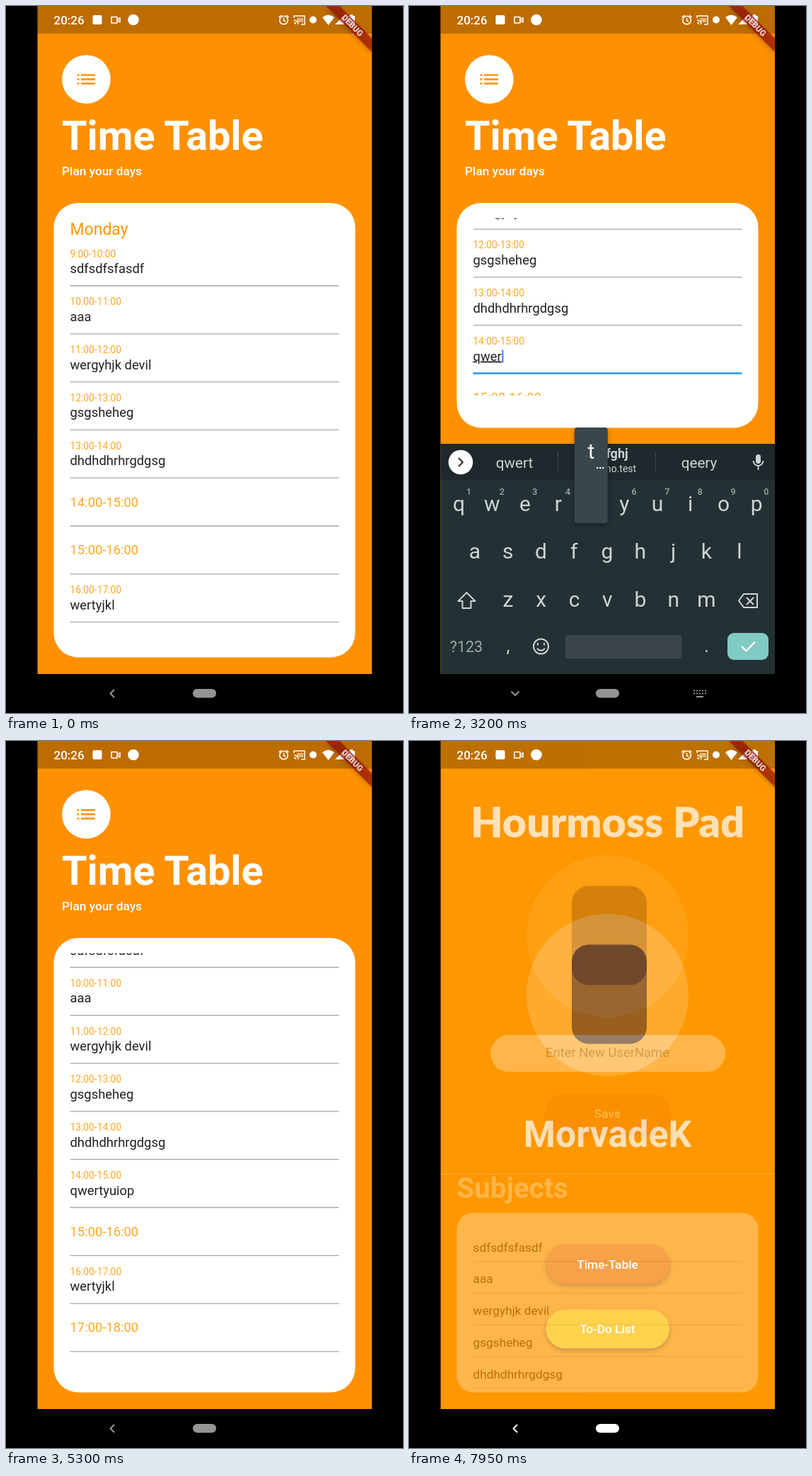
Recreate the animation shown at these times as an HTML page. Size 561x998 px, loop 8000 ms.

```html
<!DOCTYPE html>
<html lang="en">
<head>
<meta charset="utf-8">
<title>Time Table</title>
<style>
html, body { margin: 0; width: 100%; height: 100%; overflow: hidden; background: #000; }
svg { display: block; width: 100%; height: 100%; font-family: Roboto, sans-serif; fill: #fff; }
.mid { text-anchor: middle; }
.med { font-weight: 500; }
.bold { font-weight: 700; }
.title { font: 900 59px Lato, sans-serif; }
.line { fill: none; stroke-linejoin: round; }
.raised { filter: drop-shadow(0 3px 3px rgba(0, 0, 0, .3)); }
</style>
</head>
<body>
<svg id="stage" viewBox="0 0 561 998"></svg>
<script>
const text = (x, y, size, s, attrs = '') =>
  `<text x="${x}" y="${y}" font-size="${size}" ${attrs}>${s}</text>`;
const rect = (x, y, w, h, r, fill, attrs = '') =>
  `<rect x="${x}" y="${y}" width="${w}" height="${h}" rx="${r}" fill="${fill}" ${attrs}/>`;
const circle = (x, y, r, attrs = '') => `<circle cx="${x}" cy="${y}" r="${r}" ${attrs}/>`;
const line = (d, color, w = 2, attrs = '') =>
  `<path class="line" d="${d}" stroke="${color}" stroke-width="${w}" ${attrs}/>`;
const each = (list, fn) => [...list].map(fn).join('');
const MID = 'class="mid"', MID_MED = 'class="mid med"', MID_BOLD = 'class="mid bold"';

const LETTERS = 'qwertyuiop', ACTIVE = 5;
const SUBJECTS = ['sdfsdfsfasdf', 'aaa', 'wergyhjk devil', 'gsgsheheg', 'dhdhdhrhrgdgsg', '', '', 'wertyjkl', ''];
const rowY = i => 395 + 67.8 * i;
const keyX = i => 70.5 + 46.7 * i;
const screenFill = color => rect(44.5, 0, 472.5, 943, 0, color);

const avatar = y => circle(280.5, y, 114.5, 'fill-opacity=".25"') +
  rect(230, y - 71, 106, 140, 24, '#70482a');
const button = (y, color, label) => rect(193.5, y, 174.5, 55, 27.5, color, 'class="raised"') +
  text(280.5, y + 33.5, 17.25, label, MID_MED);

const home = screenFill('#ff9800') +
  text(280.5, 136, 59, 'Hourmoss Pad', 'class="mid title"') + avatar(358.5) +
  text(280.5, 573, 51.75, 'MorvadeK', MID_BOLD) +
  line('M44.5 611.5h472.5', '#ffb240', 1) +
  button(711, '#f57c00', 'Time-Table') + button(802.5, '#ffc107', 'To-Do List');

const edit = screenFill('#ff9800') + avatar(275.5) +
  rect(115, 415, 332, 52, 26, '#fff') +
  text(280.5, 446, 18.4, 'Enter New UserName', MID + ' fill="#666"') +
  button(498, '#f57c00', 'Save') +
  text(67.5, 645, 40.25, 'Subjects', 'class="bold"') +
  rect(67.5, 666, 426, 253.5, 23, '#fff') +
  each(SUBJECTS.slice(0, 5), (s, i) => text(90.5, 720.5 + 44.8 * i, 17.25, s, 'fill="#111"') +
    line(`M90.5 ${734.5 + 44.8 * i}h380`, '#bbb', 1));

const row = (subject, i) => {
  const y = rowY(i), active = i === ACTIVE, small = subject || active;
  return text(90.5, small ? y - 40.5 : y - 27.5, small ? 13.8 : 18.4, `${9 + i}:00-${10 + i}:00`,
    `fill="#ffa726" ${active ? 'id="label"' : ''}`) +
    text(90.5, y - 18, 18.4, subject, `fill="#212121" ${active ? 'id="value"' : ''}`) +
    line(`M90.5 ${y}h380`, '#a6a6a6', 1.3, active ? 'id="underline"' : '');
};

const page = screenFill('#ff9100') + circle(113.4, 103.5, 34.3) +
  line(each([97.5, 103.5, 109.5], y => `M100.5 ${y}h3M106 ${y}h20`), '#ff9100', 2.6) +
  text(79, 202.5, 57.5, 'Time Table', 'class="bold"') +
  text(79, 239, 17.25, 'Plan your days', 'class="med"') +
  rect(67.5, 278, 426, 641.5, 34.5, '#fffffd', 'id="card"') +
  `<g clip-path="url(#view)"><g id="list">${text(90.5, 323, 23, 'Monday', 'fill="#ff9800"')}
  ${each(SUBJECTS, row)}${rect(90.5, rowY(ACTIVE) - 33, 2.2, 18, 0, '#4285f4', 'id="cursor"')}</g></g>`;

const INK = '#ced4d5', DIM = '#9fa7a9';
const toolbar = line('M77 638l-6 6 6 6', '#333', 2.2) +
  line('M127 635h18v12l-6 6h-12zM139 653v-6h6M131 642h2M139 642h2M132 646q4 4 7 0', DIM) +
  text(203.5, 650, 17, 'GIF', MID_BOLD + ` fill="${DIM}"`) +
  circle(273, 644, 6, `fill="none" stroke="${DIM}" stroke-width="5"`) +
  circle(273, 644, 9, `fill="none" stroke="${DIM}" stroke-width="2.5" stroke-dasharray="4.7 4.72"`) +
  rect(332, 635, 18, 18, 2, DIM) + line('M382.5 632v25', '#3b474b', 1.2) +
  each([417, 424.5, 432], x => circle(x, 644, 2.5, `fill="${DIM}"`));

const keys = (s, x0, y) => each(s, (c, i) => text(x0 + 46.75 * i, y, 30, c, MID));
const keyboard = rect(44.5, 618, 472.5, 325, 0, '#243134') + rect(44.5, 618, 472.5, 51, 0, '#1f282c') +
  circle(73, 644, 17.3) + `<g id="toolbar">${toolbar}</g>
  <g id="hints" fill="${INK}">${line('M70 638l6 6-6 6', '#333', 2.2)}
  ${line('M210.5 630v27M348.5 630v27', '#3b474b', 1.2, 'id="dividers"')}
  ${each([149, 279.5, 410], x => text(x, 652, 20.7, '', MID))}
  <g id="contact">${text(279.5, 638, 18, 'asdfghj', MID_BOLD)}${text(279.5, 658, 14, 'a@demo.test', MID)}</g></g>` +
  rect(490, 633, 7, 13, 3.5, INK) + line('M486.5 642a7 7 0 0 0 14 0M493.5 649v6', INK, 1.8) +
  `<g fill="${INK}">${keys(LETTERS, 70.5, 712.5)}${keys('asdfghjkl', 93, 780)}${keys('zxcvbnm', 140, 847.5)}</g>
  <g fill="${DIM}">${each('1234567890', (c, i) => text(keyX(i) + 14, 690, 12.5, c, MID_MED))}
  ${text(81, 912, 21.5, '?123', MID)}</g>` +
  line('M81.5 828l-12 12h6v10h12v-10h6z', INK) +
  line('M473 830h19v19h-19l-7-9.5zM477 835l10 10M487 835l-10 10', INK) +
  text(140, 912, 25, ',', MID + ` fill="${INK}"`) + text(420.5, 912, 25, '.', MID + ` fill="${INK}"`) +
  circle(186.5, 904, 10.5, `fill="none" stroke="${INK}" stroke-width="2"`) +
  line('M182 899v3.5M191 899v3.5M181 907q5.5 6 11 0', INK) +
  rect(221, 888, 164.5, 33, 3, '#39454a') + rect(450, 885, 58, 38, 9, '#80cbc4') +
  line('M470 904l6.5 6.5 12.5-13', '#fff', 2.4) +
  `<g id="popup">${rect(-23.5, 595, 47, 135, 4, '#39464b', 'class="raised"')}
  ${text(0, 638.5, 30, '', MID)}${each([9, 13, 17], x => circle(x, 652, 1.2))}</g>`;

const status = rect(44.5, 0, 472.5, 39, 0, '#000', 'fill-opacity=".26"') +
  text(67.5, 26, 17, '20:26', 'class="med"') + rect(122.5, 13, 13, 13, 2, '#fff') +
  line('M149 15.5h8v8.5h-8zM158 19l3-2.5v6.5l-3-2.5', '#fff', 1.6) + circle(180, 19.5, 7.8) +
  circle(392.5, 20, 5.8, 'fill="none" stroke="#fff" stroke-width="1.6"') +
  line('M392.5 16.5v4l2.5 1.5M385.5 16l3.5-3M399.5 16l-3.5-3', '#fff', 1.5) +
  line('M407 17v-3h15v12h-5M407 20a6 6 0 0 1 6 6M407 23.5a2.5 2.5 0 0 1 2.5 2.5', '#fff', 1.5) +
  rect(411, 17, 9, 6, 0, '#fff', 'fill-opacity=".5"') + circle(434, 19.5, 5) +
  '<path d="M447 16q8.5-7 17 0l-8.5 11zM465 26h13v-13zM483 14h3v-2h4v2h3v13h-10z"/>' +
  `<g class="raised"><path d="M452 0h19.5l45.5 45.5v19.5z" fill="#960a0a" fill-opacity=".66"/></g>
  ${text(0, 4, 11.7, 'DEBUG', 'class="mid" font-weight="900" fill-opacity=".8" transform="translate(489.5 27.5) rotate(45)"')}`;

const nav = rect(44.5, 943, 472.5, 55, 0, '#000') +
  rect(88.5, 943, 123, 54, 26, '#1f2120', 'id="ripple"') +
  `<g id="navIcons">${line('M153 965l-5.5 5.5 5.5 5.5', '#fff', 2, 'id="chevron"')}${rect(264, 964, 33, 12.5, 6.2, '#fff')}
  ${line('M402 966.5h18M402 970.5h18', '#fff', 2, 'id="switcher" stroke-dasharray="2 2"')}
  ${line('M406 975h10', '#fff', 2, 'id="spacebar"')}</g>`;

const VIEW_TOP = 299.5;
stage.innerHTML = `<defs>
  <clipPath id="screen"><rect x="44.5" width="472.5" height="943"/></clipPath>
  <clipPath id="view"><rect id="viewRect" x="67" y="${VIEW_TOP}" width="427" height="574"/></clipPath></defs>
  <rect width="561" height="998" fill="#000"/>
  <g clip-path="url(#screen)"><g>${home}</g><g id="edit">${edit}</g><g id="page">${page}</g>
  <g id="keyboard">${keyboard}</g>${status}</g>${nav}`;

const $ = id => document.getElementById(id);
const set = (el, attrs) => { for (const k in attrs) el.setAttribute(k, attrs[k]); };
const show = (el, on) => set(el, { visibility: on ? 'inherit' : 'hidden' });
const clamp = x => Math.min(1, Math.max(0, x));
const span = (t, from, length) => clamp((t - from) / length);
const mix = (a, b, p) => a + (b - a) * p;

// Cubic bezier easing, solved by bisection
const bezier = (x1, y1, x2, y2) => x => {
  const at = (a, b, s) => 3 * a * s * (1 - s) ** 2 + 3 * b * s * s * (1 - s) + s ** 3;
  let lo = 0, hi = 1;
  for (let i = 0; i < 24; i++) {
    const m = (lo + hi) / 2;
    if (at(x1, x2, m) < x) lo = m; else hi = m;
  }
  return at(y1, y2, lo);
};
const ease = bezier(.25, .1, .25, 1), fastOut = bezier(.4, 0, .2, 1), decel = bezier(0, 0, .2, 1);

const FOCUS = 200, BLUR = 5060, TYPE = 2530, STEP = 160, COMMIT = 70;
const HINTS = [[], ['que', 'q', 'quite'], ['qw', 'qwerty', 'qwe'], ['qwe', 'qwerty', 'qwer'],
  ['qwert', '', 'qeery'], ['qwert', 'qwerty', 'query']];
const hintTexts = document.querySelectorAll('#hints > text');
const popupText = document.querySelector('#popup text');

function typing(t, focused) {
  const n = Math.max(0, Math.min(10, Math.floor((t - TYPE - COMMIT) / STEP) + 1));
  const typed = LETTERS.slice(0, n);
  $('value').textContent = typed;
  set($('value'), { 'text-decoration': focused ? 'underline' : 'none' });
  const blinkFrom = n ? TYPE + COMMIT + STEP * (n - 1) : 150;
  show($('cursor'), focused && (t - blinkFrom) % 1000 < 500);
  set($('cursor'), { x: 90.5 + (n ? $('value').getComputedTextLength() + .5 : 0) });

  show($('toolbar'), !n);
  show($('hints'), n);
  show($('dividers'), n > 0 && n < 6);
  show($('contact'), n === 4);
  const words = HINTS[n] || ['', typed, ''];
  hintTexts.forEach((el, i) => el.textContent = words[i] || '');

  const key = Math.floor((t - TYPE) / STEP);
  const pressed = key >= 0 && key < 10 && (t - TYPE) % STEP < 110;
  show($('popup'), pressed);
  if (pressed) {
    set($('popup'), { transform: `translate(${keyX(key)} 0)` });
    popupText.textContent = LETTERS[key];
  }
}

function draw() {
  const t = performance.now() % 8000;
  const focused = t >= FOCUS && t < BLUR;
  const resized = t >= 500 && t < 5110;

  // Field, card and scroll position
  const floated = fastOut(span(t, FOCUS, 200)), y = rowY(ACTIVE);
  set($('label'), { y: mix(y - 27.5, y - 40.5, floated), 'font-size': mix(18.4, 13.8, floated) });
  set($('underline'), { stroke: focused ? '#2196f3' : '#a6a6a6', 'stroke-width': focused ? 2.3 : 1.3 });
  set($('card'), { height: resized ? 317.5 : 641.5 });
  const viewBottom = resized ? 550 : 873.5;
  set($('viewRect'), { height: viewBottom - VIEW_TOP });
  const wanted = 213.5 * fastOut(span(t, 550, 200)) + 2 * span(t, TYPE + COMMIT, 50);
  set($('list'), { transform: `translate(0 ${-Math.min(wanted, 949 - viewBottom)})` });
  typing(t, focused);

  // Keyboard and navigation bar
  const raised = decel(span(t, 420, 240)) - fastOut(span(t, BLUR, 230));
  set($('keyboard'), { transform: `translate(0 ${325 * (1 - raised)})` });
  set($('keyboard'), { display: raised > 0 ? 'inline' : 'none' });
  set($('chevron'), { transform: `rotate(${resized ? -90 : 0} 150 970.5)` });
  for (const id of ['switcher', 'spacebar']) show($(id), t >= 500 && t < 4850);
  set($('navIcons'), { opacity: mix(.58, 1, span(t, 6600, 100)) });
  set($('ripple'), { opacity: Math.min(span(t, 6850, 100), 1 - span(t, 7020, 150)) });

  // Screen changes
  const slide = ease(span(t, 6935, 617));
  set($('page'), { transform: `translate(${472.5 * slide} 0)`, opacity: 1 - span(t, 6955, 612) });
  set($('edit'), { opacity: span(t, 7865, 300) });
  requestAnimationFrame(draw);
}
draw();
</script>
</body>
</html>
```
